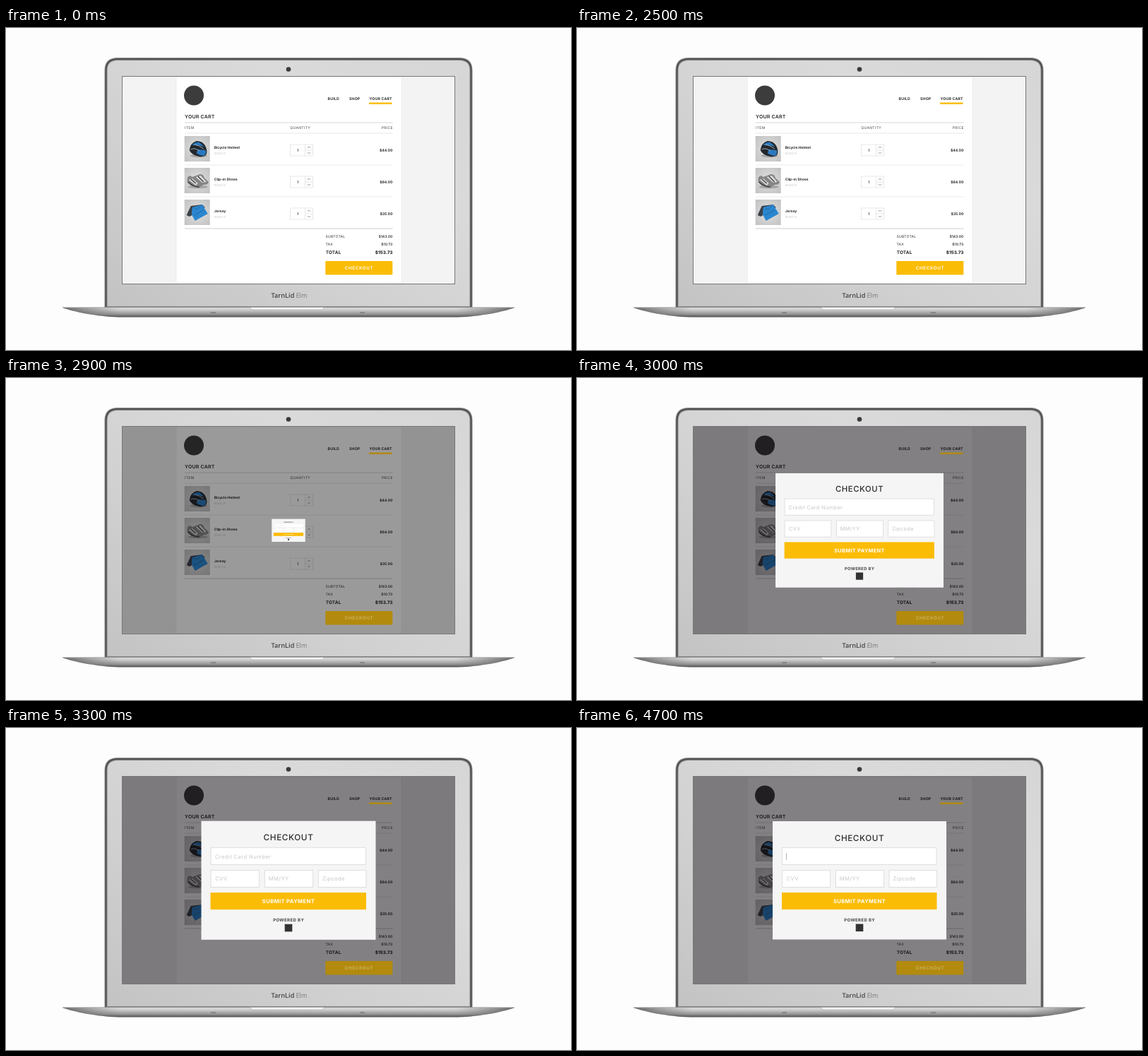
Write an HTML page that moves like this. It is 800 px wide and 456 px high and loops after 5.1 s.

```html
<!DOCTYPE html>
<html lang="en">
<head>
<meta charset="utf-8">
<title>Cart checkout</title>
<style>
html, body { margin: 0; width: 100%; height: 100%; overflow: hidden; background: #fefdfe; }
svg { display: block; width: 100vw; height: 100vh; }
text { font-family: Inter, "Liberation Sans", sans-serif; fill: #2b2b2b; text-rendering: geometricPrecision; white-space: pre; }
.nav { font-size: 5.2px; font-weight: 700; letter-spacing: .2px; }
.title { font-size: 7px; font-weight: 600; letter-spacing: .2px; }
.head { font-size: 5px; letter-spacing: .35px; fill: #444; }
.name { font-size: 5px; font-weight: 700; }
.remove { font-size: 4px; fill: #ccc; }
.price { font-size: 5.1px; font-weight: 700; }
.sum { font-size: 5px; letter-spacing: .25px; }
.amount { font-size: 5px; font-weight: 600; }
.total { font-size: 6.4px; font-weight: 700; letter-spacing: .2px; }
.grand { font-size: 6.3px; font-weight: 800; }
.buy { font-size: 6.3px; font-weight: 600; letter-spacing: .6px; }
.heading { font-size: 11.7px; font-weight: 500; letter-spacing: .6px; }
.hint { font-size: 7.6px; letter-spacing: .4px; fill: #c8c8c8; }
.submit { font-size: 7.6px; font-weight: 700; letter-spacing: .35px; fill: #fff; }
.powered { font-size: 6px; font-weight: 700; letter-spacing: .4px; fill: #444; }
.model { font: 600 9.2px "Open Sans", sans-serif; fill: #444; }
.end { text-anchor: end; }
.mid { text-anchor: middle; }
</style>
</head>
<body>
<svg id="stage" viewBox="0 0 800 456" preserveAspectRatio="none">
  <defs>
    <linearGradient id="lid" x1="0" y1="1" x2="1" y2="0">
      <stop offset="0" stop-color="#c3c3c3"/><stop offset=".4" stop-color="#d2d2d2"/>
      <stop offset=".7" stop-color="#dadada"/><stop offset="1" stop-color="#d6d6d6"/>
    </linearGradient>
    <linearGradient id="base" x1="0" y1="0" x2="0" y2="1">
      <stop offset="0" stop-color="#e4e4e4"/><stop offset=".3" stop-color="#c4c4c4"/>
      <stop offset=".7" stop-color="#929292"/><stop offset="1" stop-color="#4c4c4c"/>
    </linearGradient>
    <linearGradient id="tips">
      <stop offset="0" stop-color="#444" stop-opacity=".8"/><stop offset=".13" stop-color="#777" stop-opacity="0"/>
      <stop offset=".87" stop-color="#777" stop-opacity="0"/><stop offset="1" stop-color="#444" stop-opacity=".8"/>
    </linearGradient>
    <radialGradient id="photo" r=".75">
      <stop offset="0" stop-color="#e2e2e2"/><stop offset="1" stop-color="#bebebe"/>
    </radialGradient>
    <clipPath id="view"><rect x="165" y="69" width="470" height="293"/></clipPath>
    <path id="deck" d="M80 396H720C704 402 672 408.5 640 409.5H160C128 408.5 96 402 80 396Z"/>
  </defs>

  <path d="M141.5 396V60Q141.500 44 158 44H642Q658.500 44 658.500 60V396Z" fill="url(#lid)" stroke="#828282" stroke-width="4"/>
  <path d="M141.500 396V60Q141.500 44 158 44H642Q658.500 44 658.500 60V396" fill="none" stroke="#4a4a4a" stroke-width="1.600"/>
  <circle cx="400" cy="58.5" r="3.3" fill="#3a3a3a"/>
  <use href="#deck" fill="url(#base)"/>
  <use href="#deck" fill="url(#tips)"/>
  <path d="M80 395.8H720" stroke="#a4a4a4"/>
  <path d="M346 395.5H450V397Q449 399 446 399H350Q347 399 346 397Z" fill="#f3f3f3" stroke="#999" stroke-width=".5"/>
  <path d="M290 403H297M501 403H508" stroke="#666" stroke-width="1.2"/>
  <text class="model" x="375.5" y="382">TarnLid <tspan font-weight="300">Elm</tspan></text>

  <rect x="164.5" y="68.5" width="471" height="294" fill="#f3f3f3" stroke="#777"/>
  <g clip-path="url(#view)">
    <rect x="241" y="69" width="319" height="293" fill="#fff" stroke="#e8e8e8" stroke-width=".7"/>
    <g id="page"></g>
    <rect id="shade" x="165" y="69" width="470" height="293" fill="#060306"/>
    <rect id="underline" x="514" y="105.5" width="32.5" height="2.4"/>
    <g id="buy">
      <rect id="buyBox" x="452.3" y="330" width="95" height="19.4" rx=".8"/>
      <text id="buyText" class="buy mid" x="500" y="342">CHECKOUT</text>
    </g>
    <g id="modal"></g>
  </g>
</svg>
<script>
const LOOP = 5100, STEP = 100;
const YELLOW = [251, 188, 5], DIM_YELLOW = [178, 138, 14], PRESSED = [205, 160, 15];
const WHITE = [255, 255, 255], DIM_WHITE = [208, 182, 100];
const $ = id => document.getElementById(id);
const text = (cls, x, y, str, id = '') => `<text id="${id}" class="${cls}" x="${x}" y="${y}">${str}</text>`;
const rule = (y, color) => `<path d="M253 ${y}H547.5" stroke="${color}" stroke-width=".8"/>`;
const field = (x, y, w) =>
  `<rect x="${x}" y="${y}" width="${w}" height="24" fill="#fff" stroke="#dcdcdc" stroke-width=".9"/>`;
const rgb = color => `rgb(${color})`;
const mix = (a, b, k) => rgb(a.map((v, i) => Math.round(v + (b[i] - v) * k)));

// Product pictures, drawn in a 36 x 36 tile
const helmet = `
  <ellipse cx="20" cy="28" rx="12" ry="2.5" fill="#a6a6a6"/>
  <path d="M7 20Q8 10 17 7Q25 7 29 13Q33 20 31 26Q27 30 21 29Q10 27 7 20Z" fill="#23272c"/>
  <path d="M11 13Q15 8 21 9L28 15L19 13ZM19 19L30 20Q32 25 27 28Q20 27 17 24Z" fill="#2a78bd"/>
  <path d="M9 19Q14 16 21 21M14 12Q21 13 27 18" fill="none" stroke="#9fb0bf" stroke-width="1"/>`;
const shoes = `
  <ellipse cx="19" cy="27" rx="14" ry="2.5" fill="#a6a6a6"/>
  <path d="M4 14Q7 9 11 13L22 9Q27 9 28 14L34 20Q34 24 27 24L21 28Q8 27 4 20Z" fill="#858585"/>
  <path d="M6 17L11 15L19 22L16 25ZM16 13L23 11L31 20L25 21Z" fill="#dcdcdc"/>
  <path d="M5 20Q12 27 21 27M9 16L16 22M19 12L27 20" fill="none" stroke="#3a3a3a" stroke-width="1.3"/>`;
const jersey = `
  <path d="M3 22L9 9L25 7L29 11L15 20L7 24Z" fill="#3b4149"/>
  <path d="M11 11L25 7L33 20L15 30L10 21Z" fill="#2a86cf"/>
  <path d="M14 12L18 14L23 9M14 22L27 15" fill="none" stroke="#1f6099" stroke-width=".8"/>`;

function row(name, price, art, i) {
  return `<g transform="translate(0 ${i * 45})">
    <rect x="252.7" y="153" width="36" height="36" fill="url(#photo)"/>
    <g transform="translate(252.7 153)">${art}</g>
    ${text('name', 294.7, 171, name)}${text('remove', 294.7, 178.6, 'REMOVE')}
    <rect x="402.5" y="165" width="32" height="16" fill="#fff" stroke="#e3e3e3" stroke-width=".8"/>
    <path d="M423.5 165V181M423.5 173H434.5" stroke="#e3e3e3" stroke-width=".8"/>
    <path d="M427 170L429 168L431 170M427 176L429 178L431 176" fill="none" stroke="#888" stroke-width=".8"/>
    ${text('amount mid', 413.2, 175, '1')}${text('price end', 547.5, 175, price)}
  </g>`;
}

$('page').innerHTML =
  '<circle cx="266" cy="95.5" r="14" fill="#3c3c3c"/>' +
  text('nav', 455.5, 102, 'BUILD') + text('nav', 486, 102, 'SHOP') + text('nav', 514.5, 102, 'YOUR CART') +
  text('title', 253, 127.8, 'YOUR CART') +
  text('head', 253, 143.2, 'ITEM') + text('head', 402.3, 143.2, 'QUANTITY') + text('head end', 547.8, 143.2, 'PRICE') +
  rule(134, '#cdcdcd') + rule(149, '#e2e2e2') + rule(194, '#e6e6e6') + rule(239, '#e6e6e6') + rule(284, '#c0c0c0') +
  row('Bicycle Helmet', '$44.00', helmet, 0) +
  row('Clip-in Shoes', '$64.00', shoes, 1) +
  row('Jersey', '$35.00', jersey, 2) +
  text('sum', 452.5, 296.5, 'SUBTOTAL') + text('amount end', 547.3, 296.5, '$143.00') +
  text('sum', 452.5, 307.7, 'TAX') + text('amount end', 547.3, 307.7, '$10.73') +
  text('total', 452.7, 320, 'TOTAL') + text('grand end', 547.5, 320, '$153.73');

$('modal').innerHTML =
  '<rect x="277" y="132" width="246" height="167.5" fill="#f5f5f5"/>' +
  text('heading mid', 400, 159.6, 'CHECKOUT') +
  field(290.5, 169.5, 218.5) + field(290.5, 201.5, 68) + field(366.5, 201.5, 68) + field(442, 201.5, 67.5) +
  text('hint', 296.3, 184.8, 'Credit Card Number', 'cardHint') +
  text('hint', 296.6, 216.3, 'CVV') + text('hint', 371.8, 216.3, 'MM/YY') + text('hint', 447.5, 216.3, 'Zipcode') +
  '<path id="caret" d="M296.5 177V187" stroke="#aaa" stroke-width=".9"/>' +
  `<rect x="290" y="233" width="219.5" height="24" fill="${rgb(YELLOW)}"/>` +
  text('submit mid', 400, 247.8, 'SUBMIT PAYMENT') +
  text('powered mid', 400.2, 273.5, 'POWERED BY') +
  '<rect x="394.7" y="277.5" width="10.6" height="10.6" fill="#333"/>';

const scaleAt = (x, y, s) => `translate(${x} ${y}) scale(${s}) translate(${-x} ${-y})`;
const show = (id, on) => $(id).setAttribute('visibility', on ? 'inherit' : 'hidden');

// Values per step once the dialog starts to open
const SHADE = [.17, .4, .5];
const POP = [0, .193, .967, 1.05, 1.02, 1.004, 1];
const pick = (list, i) => i < 0 ? 0 : list[Math.min(i, list.length - 1)];

function draw(time) {
  const t = Math.floor(time % LOOP / STEP) * STEP;

  const press = (t - 2200) / 1000;
  const bounce = press < 0 || press > .25 ? 0 : .125 * Math.exp(-10 * press) * Math.cos(Math.PI * press * 10);
  $('buy').setAttribute('transform', scaleAt(499.8, 339.7, 1 - bounce));

  const open = (t - 2800) / STEP;
  const shade = pick(SHADE, open), dim = Math.min(1, shade * 2.5);
  const gold = mix(YELLOW, DIM_YELLOW, dim);
  $('shade').setAttribute('fill-opacity', shade);
  $('underline').setAttribute('fill', gold);
  $('buyBox').setAttribute('fill', press === 0 ? rgb(PRESSED) : gold);
  $('buyText').style.fill = mix(WHITE, DIM_WHITE, dim);

  const pop = pick(POP, open);
  show('modal', pop > 0);
  $('modal').setAttribute('transform', scaleAt(400, 215.8, pop || 1));
  show('cardHint', t < 4600);
  show('caret', t >= 4600);
}

const start = performance.now();
function tick(now) {
  draw(Math.max(0, now - start));
  requestAnimationFrame(tick);
}
draw(0);
requestAnimationFrame(tick);
</script>
</body>
</html>
```
